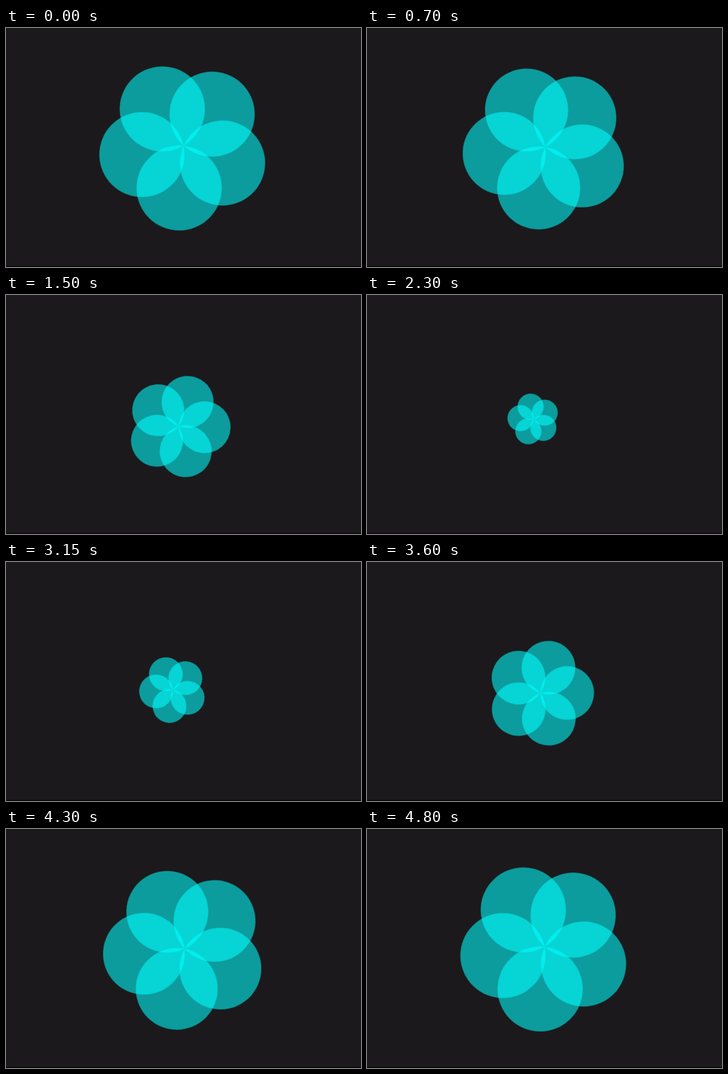
Animation of 600 by 405 pixels, one loop 4.85 s. Source, as an HTML page:

```html
<!DOCTYPE html>
<html lang="en">
<head>
<meta charset="utf-8">
<title>Breathing flower</title>
<style>
  html, body { margin: 0; width: 100%; height: 100%; overflow: hidden; background: #1b191b; }
  svg { display: block; width: 600px; height: 405px; }
  circle { fill: #0ff; fill-opacity: .57; }
</style>
</head>
<body>
<svg viewBox="0 0 600 405">
  <g transform="translate(300.2 199.5)"><g id="flower"></g></g>
  <rect y="403" width="600" height="2" fill="#0b0a0b"/>
</svg>
<script>
  const LOOP = 4850, RADIUS = 72, PETALS = 5;
  const flower = document.getElementById('flower');

  for (let i = 0; i < PETALS; i++) {
    const petal = document.createElementNS(flower.namespaceURI, 'circle');
    petal.setAttribute('r', RADIUS);
    petal.setAttribute('cy', -RADIUS);
    petal.setAttribute('transform', `rotate(${i * 360 / PETALS})`);
    flower.append(petal);
  }

  const open = 'rotate(-30deg) scale(1) translate(0px, 0px)';
  const closed = `rotate(60deg) scale(.3) translate(0px, ${RADIUS}px)`;

  // time in ms, pose, easing towards the next step
  const steps = [
    [0, open, 'linear'],
    [434, open, 'ease-in-out'],
    [2434, closed, 'linear'],
    [2634, closed, 'ease-in-out'],
    [4634, open, 'linear'],
    [LOOP, open, 'linear']
  ];

  flower.animate(
    steps.map(([time, transform, easing]) => ({ offset: time / LOOP, transform, easing })),
    { duration: LOOP, iterations: Infinity }
  );
</script>
</body>
</html>
```
